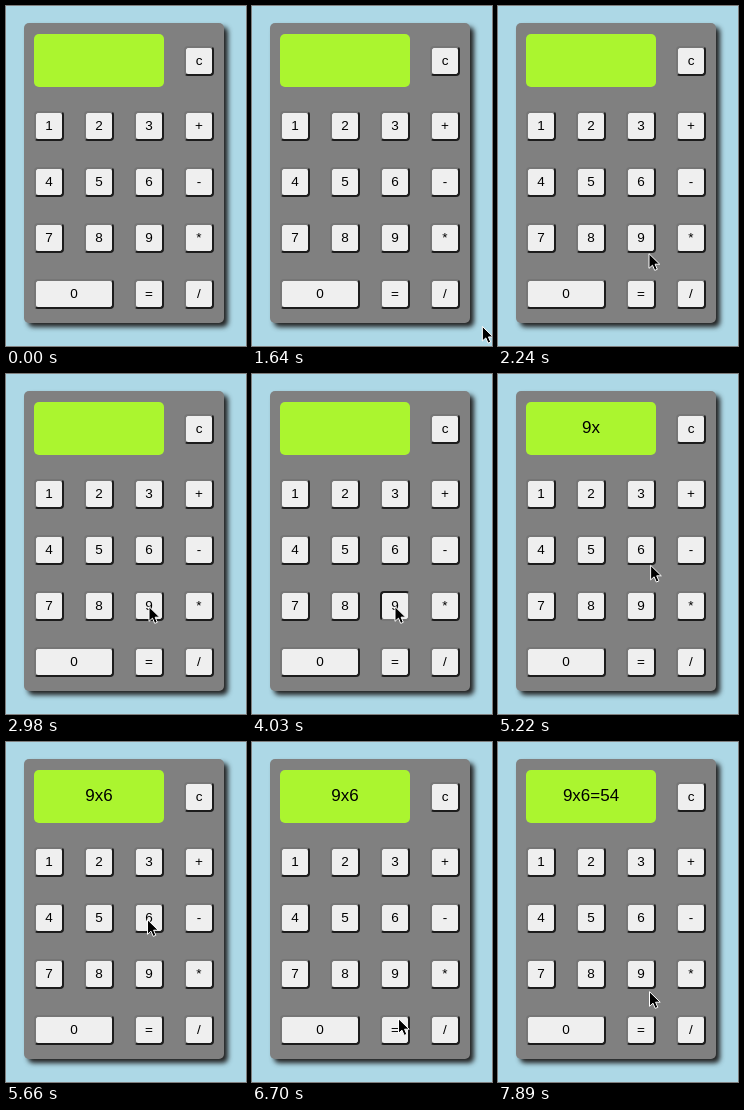
An HTML page for the animation above (8000 ms loop, 240 px wide and 340 px high).

```html
<!DOCTYPE html>
<html lang="en">
<head>
<meta charset="utf-8">
<title>Calculator</title>
<style>
  html, body { margin: 0; width: 100%; height: 100%; overflow: hidden; background: #add8e6; }
  body { position: relative; font-family: "Liberation Sans", Arial, sans-serif; color: #000; }
  body * { position: absolute; box-sizing: border-box; }
  #case { left: 18px; top: 17px; width: 200px; height: 300px; border-radius: 5px;
    background: #808080; box-shadow: 4px 4px 5px #222; }
  #display { left: 28px; top: 28px; width: 130px; height: 53px; border-radius: 5px;
    background: #abf52f; font-size: 17px; line-height: 52px; text-align: center; }
  .key { height: 30px; border: 2px solid; border-color: #767676 #1c1c1c #1c1c1c #767676;
    border-radius: 4px; background: #efefef; font-size: 13.5px; line-height: 26px; text-align: center; }
  .key.down { border-color: #1c1c1c #767676 #767676 #1c1c1c; }
  #pointer { left: 0; top: 0; width: 14px; height: 20px; overflow: visible; }
</style>
</head>
<body>
<div id="case"></div>
<div id="display"></div>
<svg id="pointer" viewBox="0 0 14 20">
  <path d="M.5 .7V15.3L4 12.2 6.2 17.4 8.8 16.3 6.6 11.2H11.2Z" stroke="#fff"/>
</svg>
<script>
const LOOP = 8000, TICK = 146;
const display = document.getElementById("display");
const pointer = document.getElementById("pointer");
const keys = {};

function addKey(label, x, y, width = 30) {
  const key = document.createElement("div");
  key.className = "key";
  key.textContent = label;
  key.style.cssText = `left:${x}px;top:${y}px;width:${width}px`;
  document.body.insertBefore(key, pointer);
  keys[label] = key;
}

addKey("c", 178, 40);
["123+", "456-", "789*"].forEach((row, r) =>
  [...row].forEach((label, c) => addKey(label, 28 + 50 * c, 105 + 56 * r)));
addKey("0", 28, 273, 80);
addKey("=", 128, 273);
addKey("/", 178, 273);

// Pointer moves: start time, number of steps, end point
const entry = [252, 340];
const glides = [
  [1500, 6, 150.5, 247],
  [2540, 4, 142.5, 232],
  [4330, 3, 190, 237],
  [5070, 3, 141, 177],
  [6400, 3, 146, 276],
  [6840, 1, 144, 287.5],
  [7890, 1, 151, 249]
];

// Key presses: down, up, key, display text on release
const presses = [
  [4030, 4180, "9", "9"],
  [4770, 4920, "*", "9x"],
  [5510, 5660, "6", "9x6"],
  [6990, 7140, "=", "9x6=54"]
];

function pointerAt(t) {
  let [x, y] = entry;
  for (const [start, steps, endX, endY] of glides) {
    if (t < start) break;
    const step = Math.min(steps, Math.floor((t - start) / TICK) + 1);
    const p = 1 - (1 - step / steps) ** 1.35;
    x += (endX - x) * p;
    y += (endY - y) * p;
  }
  return [x, y];
}

function draw() {
  const t = performance.now() % LOOP;
  const [x, y] = pointerAt(t);
  pointer.style.transform = `translate(${x}px, ${y}px)`;
  pointer.style.visibility = t < glides[0][0] ? "hidden" : "visible";

  let text = "";
  for (const [down, up, label, result] of presses) {
    keys[label].classList.toggle("down", t >= down && t < up);
    if (t >= up) text = result;
  }
  display.textContent = text;
  requestAnimationFrame(draw);
}
draw();
</script>
</body>
</html>
```
